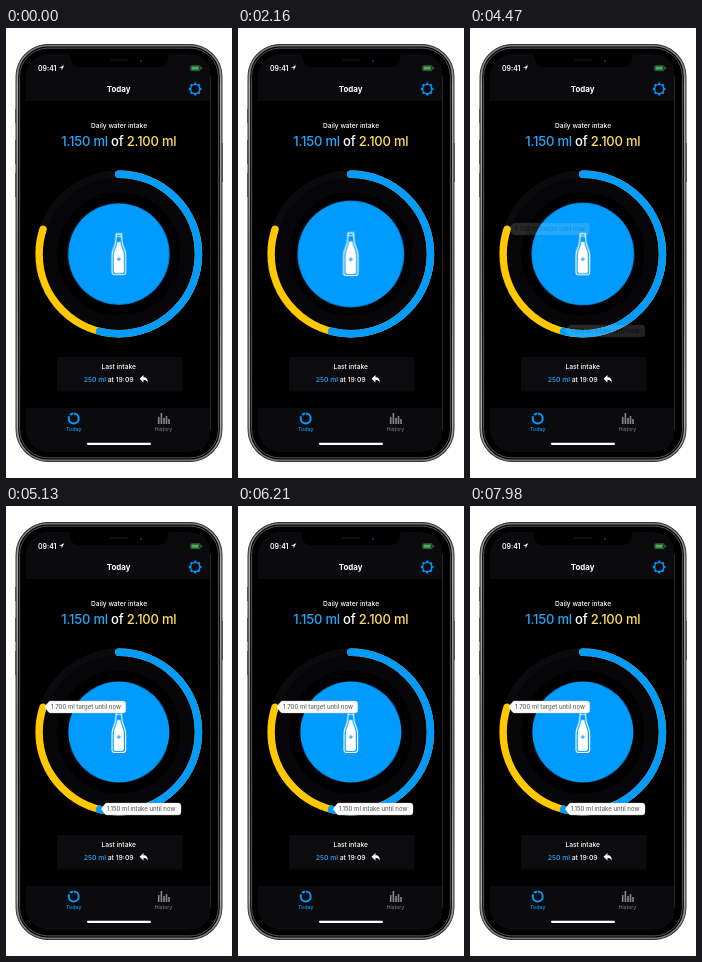
Write an HTML page that moves like this. It is 226 by 450 pixels and loops after 8 s.

```html
<!DOCTYPE html>
<html lang="en">
<head>
<meta charset="utf-8">
<title>Water intake</title>
<style>
  html, body { margin: 0; width: 100%; height: 100%; overflow: hidden; background: #fff; }
  svg { display: block; width: 100vw; height: 100vh; }
  text { font-family: Inter, Roboto, sans-serif; font-weight: 500; fill: #fff; }
  .mid { text-anchor: middle; }
  .blue { fill: #009bff; }
  .sky { fill: #22a7ff; }
  .gold { fill: #ffdc5c; }
  .line { fill: none; }
  .ring { fill: none; stroke-width: 7.4; stroke-linecap: round; }
  .pulse {
    transform-origin: 112.8px 226px;
    animation: pulse 8s cubic-bezier(.37, 0, .63, 1) infinite;
  }
  .tip { animation: tip 8s ease-out infinite; }
  .tip path { fill: #fff; stroke: #bbb; stroke-width: .4; }
  .tip text { font-size: 6px; fill: #666; }
  @keyframes pulse {
    0% { transform: scale(1.004); }
    20.25% { transform: scale(1.07); }
    42.5% { transform: scale(1); }
    54% { transform: scale(1.02); }
    60%, 100% { transform: scale(1); }
  }
  @keyframes tip {
    0%, 55.5% { opacity: 0; }
    60%, 100% { opacity: 1; }
  }
</style>
</head>
<body>
<svg viewBox="0 0 226 450">
  <defs>
    <linearGradient id="metal" x2="0" y2="1">
      <stop stop-color="#777"/>
      <stop offset=".1" stop-color="#b0b0b0"/>
      <stop offset=".5" stop-color="#858585"/>
      <stop offset=".9" stop-color="#b0b0b0"/>
      <stop offset="1" stop-color="#777"/>
    </linearGradient>
    <clipPath id="screen"><rect x="20" y="26" width="186" height="398" rx="23"/></clipPath>
  </defs>

  <!-- Phone body -->
  <path d="M9.5 81v14M9.5 112v24M9.5 145v24M216.5 115v39" stroke="#777" stroke-width="1"/>
  <rect x="10" y="16.5" width="206" height="417" rx="32" fill="#000" stroke="#333"/>
  <rect x="11.3" y="17.8" width="203.4" height="414.4" rx="30.7" fill="#000" stroke="url(#metal)" stroke-width="1.6"/>
  <rect x="13.6" y="20.1" width="198.8" height="409.8" rx="28.4" fill="#000" stroke="#555" stroke-width="1"/>
  <path d="M204.5 48v354" stroke="#2c2c2e" stroke-width=".8"/>
  <g clip-path="url(#screen)">
    <rect x="20" y="26" width="184" height="47" fill="#0b0b0e"/>
    <rect x="20" y="380" width="184" height="45" fill="#0b0b0e"/>
  </g>
  <path d="M60 25h106q-4 0-4 4q0 10-10 10H74q-10 0-10-10q0-4-4-4z" fill="#000"/>
  <path d="M105 32h17" stroke="#161618" stroke-width="1.6" stroke-linecap="round"/>
  <circle cx="135" cy="33" r="1.2" fill="#10305c"/>

  <!-- Status and title bars -->
  <text x="32" y="43.2" font-size="6.9" style="font-weight:600">09:41</text>
  <path d="M58.2 37.3l-5.3 2.5h2.7v2.8z" fill="#fff"/>
  <rect x="184.7" y="37.7" width="9.6" height="5" rx="1.3" fill="#153a1c" stroke="#5d7562" stroke-width=".6"/>
  <rect x="185.6" y="38.6" width="7" height="3.2" rx=".6" fill="#3fb455"/>
  <path d="M195.6 39.4v1.6" stroke="#888" stroke-width=".8"/>
  <text class="mid" x="112.7" y="63.6" font-size="7.9" style="font-weight:700">Today</text>
  <g class="line" stroke="#009bff">
    <circle cx="189.2" cy="61" r="4.6" stroke-width="1.4"/>
    <circle cx="189.2" cy="61" r="5.7" pathLength="16" stroke-width="1.4" stroke-dasharray="1" stroke-dashoffset=".5"/>
  </g>

  <!-- Intake summary -->
  <text class="mid" x="113" y="99.6" font-size="6.6">Daily water intake</text>
  <text class="mid" x="112.9" y="118.4" font-size="13" letter-spacing="-.2"><tspan class="sky">1.150 ml</tspan> of <tspan class="gold">2.100 ml</tspan></text>

  <!-- Progress ring -->
  <circle class="line" cx="112.8" cy="226" r="69" stroke="#060608" stroke-width="15"/>
  <circle class="ring" cx="112.8" cy="226" r="79.7" stroke="#0b0b0e"/>
  <g transform="rotate(-90 112.8 226)">
    <circle class="ring" cx="112.8" cy="226" r="79.7" pathLength="2100" stroke="#ffc800" stroke-dasharray="1681 2100"/>
    <circle class="ring" cx="112.8" cy="226" r="79.7" pathLength="2100" stroke="#009bff" stroke-dasharray="1132 2100"/>
  </g>

  <g class="pulse">
    <circle class="blue" cx="112.8" cy="226" r="50.5"/>
    <path d="M110.2 206h5.2l.6 8c.4 5 3.6 7.500 3.600 13v17q0 2.500-2.500 2.500h-8.600q-2.500 0-2.500-2.500V227c0-5.500 3.200-8 3.600-13z" fill="#009bff" stroke="#fff" stroke-width="1.1"/>
    <path d="M111.200 214h3.200c.4 5.500 3.500 8 3.500 13.500v15.800q0 1.700-1.700 1.700h-6.800q-1.700 0-1.700-1.700V227.500c0-5.500 3.100-8 3.500-13.500z" fill="#fff"/>
    <path d="M110 208.500h5.600" stroke="#fff" stroke-width=".8"/>
    <path d="M110.800 231h4M112.800 229v4" stroke="#009bff" stroke-width="1"/>
  </g>

  <g class="tip">
    <path d="M38.500 201l4-5q.8-1 2-1h72.500q2.800 0 2.800 2.800v6.400q0 2.800-2.800 2.800H44.500q-1.200 0-2-1z"/>
    <text x="45" y="203.200">1.700 ml target until now</text>
  </g>
  <g class="tip">
    <path d="M95 303l4-5q.8-1 2-1h71.200q2.800 0 2.800 2.800v6.400q0 2.800-2.800 2.800H101q-1.200 0-2-1z"/>
    <text x="100.700" y="305.200">1.150 ml intake until now</text>
  </g>

  <!-- Last intake -->
  <rect x="51" y="329" width="125.500" height="34.500" rx="2" fill="#0c0c0f"/>
  <text class="mid" x="112.700" y="341.300" font-size="6.700">Last intake</text>
  <text x="77.700" y="354.200" font-size="6.800"><tspan class="sky">250 ml</tspan> at 19:09</text>
  <path d="M133.500 350.700l4-3.700v2.200c3 0 4.500 2 4.200 5.300-1-1.800-2.100-2.400-4.200-2.400v2.300z" fill="#fff"/>

  <!-- Tab bar -->
  <circle class="line" cx="67.700" cy="390.400" r="5" stroke="#009bff" stroke-width="2" stroke-dasharray="25 1.600 3.200 1.600" transform="rotate(-90 67.700 390.400)"/>
  <text class="mid blue" x="67.700" y="403.300" font-size="5.300">Today</text>
  <path d="M152.700 396v-7M155.400 396v-11M158 396v-6M160.500 396v-8M163 396v-5" stroke="#88888c" stroke-width="1.600"/>
  <text class="mid" x="157.500" y="403.300" font-size="5.100" style="fill:#77777b">History</text>
  <path d="M82 415.800h62" stroke="#fff" stroke-width="2.200" stroke-linecap="round"/>
</svg>
</body>
</html>
```
